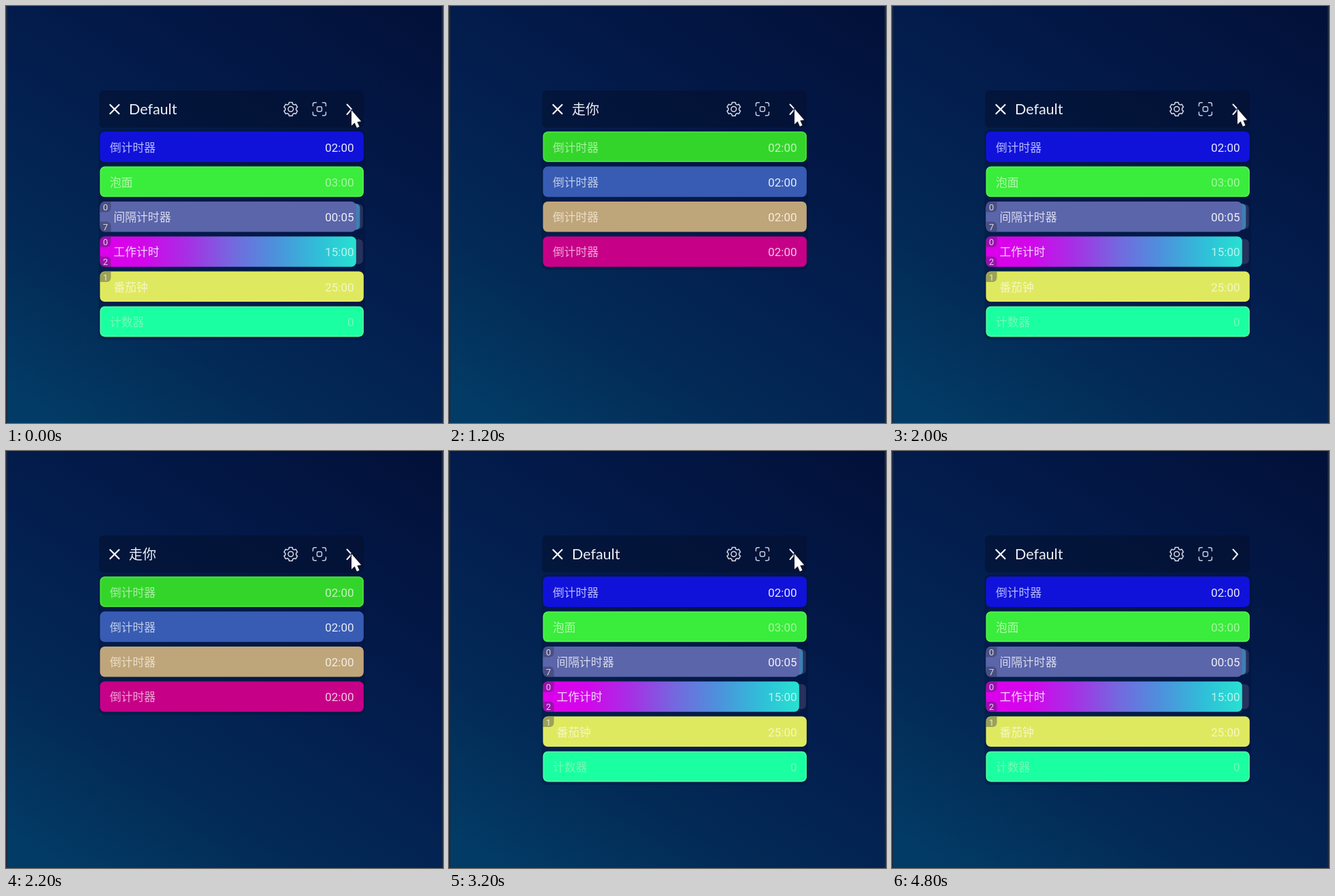
Recreate the animation shown at these times as an HTML page with a canvas. Size 640 by 612 pixels, loop 4.9 s.

```html
<!DOCTYPE html>
<html lang="zh">
<head>
<meta charset="utf-8">
<title>Timers</title>
<style>
html, body { margin: 0; width: 100%; height: 100%; overflow: hidden; background: #031a48; }
canvas { display: block; width: 640px; height: 612px; }
</style>
</head>
<body>
<canvas id="stage" width="640" height="612"></canvas>
<script>
const ctx = document.getElementById('stage').getContext('2d');
const LOOP = 4900;
const CJK = '"Noto Sans CJK SC", "Noto Sans CJK", sans-serif';
const LATIN = 'Roboto, "Noto Sans", sans-serif';
const LEFT = 137.6, WIDTH = 386.2, ROW_H = 44.6, TOP = 184.3, PITCH = 51.3;

// Page switches: time and page index
const switches = [[0, 0], [500, 1], [1300, 0], [2200, 1], [3000, 0]];
const CURSOR_END = 4000;

const pages = [
  {
    title: 'Default', font: '400 21.5px Lato, "Noto Sans", sans-serif', rows: [
      { name: '倒计时器', time: '02:00', fill: '#1012da', ink: '#b9bbff', num: '#e8e9ff' },
      { name: '泡面', time: '03:00', fill: '#3aec3c', ink: '#b4faaf', num: '#a4f89e', edge: '#55f050' },
      { name: '间隔计时器', time: '00:05', fill: '#5b65a9', ink: '#d9dcef', num: '#eef0fa', tags: ['0', '7'], gap: 11, sliver: '#3f7fb4' },
      { name: '工作计时', time: '15:00', fill: 'rainbow', ink: '#f3d9fb', num: '#b4f4ee', tags: ['0', '2'], gap: 11 },
      { name: '番茄钟', time: '25:00', fill: '#dfe960', ink: '#f4f7c0', num: '#f4f7c0', tags: ['1'] },
      { name: '计数器', time: '0', fill: '#1affa2', ink: '#74fab4', num: '#74fab4', edge: '#5bf7a0' }
    ]
  },
  {
    title: '走你', font: '400 20px ' + CJK, rows: [
      { fill: '#34d52b', ink: '#a9efa2', num: '#c0f4ba', edge: '#4ae040' },
      { fill: '#385cb3', ink: '#c3cee9', num: '#e6ebf7' },
      { fill: '#bfa57a', ink: '#eadfca', num: '#f3ecdf' },
      { fill: '#c70088', ink: '#f0a6d8', num: '#f6c4e5' }
    ].map(row => ({ name: '倒计时器', time: '02:00', ...row }))
  }
];

function box(x, y, w, h, r, fill) {
  ctx.beginPath();
  ctx.roundRect(x, y, w, h, r);
  ctx.fillStyle = fill;
  ctx.fill();
}

function text(str, x, y, font, color, align = 'left') {
  ctx.font = font;
  ctx.fillStyle = color;
  ctx.textAlign = align;
  ctx.fillText(str, x, y);
}

function line(points, width, color, close) {
  ctx.beginPath();
  points.forEach(([x, y]) => ctx.lineTo(x, y));
  if (close) ctx.closePath();
  ctx.lineWidth = width;
  ctx.strokeStyle = color;
  ctx.stroke();
}

function gradient(x0, y0, x1, y1, colors) {
  const g = ctx.createLinearGradient(x0, y0, x1, y1);
  colors.forEach((c, i) => g.addColorStop(i / (colors.length - 1), c));
  return g;
}

function drawBackground() {
  ctx.fillStyle = gradient(540, -40, 110, 640, ['#021139', '#031745', '#031f4f', '#032a56', '#023c66']);
  ctx.fillRect(0, 0, 640, 612);
  ctx.fillStyle = '#1d2940';
  ctx.fillRect(0, 0, 2, 612);
  ctx.fillRect(638, 0, 2, 612);
}

function drawGear(cx, cy) {
  const pts = [];
  for (let i = 0; i < 6; i++) {
    const mid = i * Math.PI / 3 + Math.PI / 6;
    for (const [turn, r] of [[-0.36, 8], [-0.24, 10.2], [0.24, 10.2], [0.36, 8]]) {
      pts.push([cx + r * Math.cos(mid + turn), cy + r * Math.sin(mid + turn)]);
    }
  }
  line(pts, 1.5, '#d5dbe8', true);
  ctx.beginPath();
  ctx.arc(cx, cy, 3.8, 0, 7);
  ctx.stroke();
}

function drawScan(cx, cy) {
  ctx.lineWidth = 1.5;
  ctx.strokeStyle = '#c3cbdc';
  for (const sx of [-1, 1]) for (const sy of [-1, 1]) {
    ctx.beginPath();
    ctx.moveTo(cx + sx * 9.5, cy + sy * 4.5);
    ctx.lineTo(cx + sx * 9.5, cy + sy * 7);
    ctx.quadraticCurveTo(cx + sx * 9.5, cy + sy * 9.5, cx + sx * 7, cy + sy * 9.5);
    ctx.lineTo(cx + sx * 4.5, cy + sy * 9.5);
    ctx.stroke();
  }
  ctx.beginPath();
  ctx.roundRect(cx - 3.5, cy - 3.5, 7, 7, 2);
  ctx.stroke();
}

function drawHeader(page) {
  box(LEFT - 1, 124, WIDTH + 1, 54.5, 6, 'rgba(4, 14, 42, 0.5)');
  ctx.lineCap = ctx.lineJoin = 'round';
  line([[152.5, 145], [165.5, 158]], 2.2, '#fff');
  line([[165.5, 145], [152.5, 158]], 2.2, '#fff');
  text(page.title, 180, 159.3, page.font, '#eef1f7');
  drawGear(417, 151.3);
  drawScan(459, 151.3);
  line([[499.5, 144.5], [506, 151.5], [499.5, 159]], 2, '#f2f4f8');
}

function drawRow(row, y, age) {
  // Partial bars shrink from full width when their page opens
  const gap = (row.gap || 0) * (1 - Math.max(0, 1 - age / 190) ** 1.9);
  const w = WIDTH - gap;
  if (row.gap) {
    box(LEFT, y + 4, WIDTH - 1, ROW_H - 8, 6, '#26315c');
    if (row.sliver) box(LEFT, y + 3, WIDTH - gap * 0.5, ROW_H - 6, 6, row.sliver);
  }
  const fill = row.fill === 'rainbow'
    ? gradient(LEFT, 0, LEFT + WIDTH, 0, ['#dd00ea', '#d206ea', '#a630e5', '#7468df', '#4c92dc', '#2fc0d8', '#25e8d0'])
    : row.fill;
  box(LEFT, y, w, ROW_H, 7, fill);
  if (row.edge) {
    ctx.beginPath();
    ctx.roundRect(LEFT + 1, y + 1, w - 2, ROW_H - 2, 6);
    ctx.lineWidth = 1.5;
    ctx.strokeStyle = row.edge;
    ctx.stroke();
  }
  (row.tags || []).forEach((tag, i) => {
    const ty = y + 0.5 + i * 29;
    box(LEFT, ty, 16, 15, i ? [0, 6, 0, 7] : [7, 0, 6, 0], 'rgba(45, 45, 70, 0.38)');
    text(tag, LEFT + 8, ty + 12.5, '13px ' + LATIN, 'rgba(255, 255, 255, 0.78)', 'center');
  });
  text(row.name, row.tags ? 157.5 : 152, y + 29.2, '16.8px ' + CJK, row.ink);
  text(row.time, 509.5, y + 29.2, '17px ' + LATIN, row.num, 'right');
}

function drawCursor(x, y) {
  const shape = [[0, 0], [0, 24.5], [5.3, 19.8], [9, 28], [13, 26.2], [9.4, 18.4], [16, 17.6]]
    .map(([dx, dy]) => [x + dx * 0.88, y + dy * 0.92]);
  ctx.lineJoin = 'round';
  line(shape, 2.4, '#10162c', true);
  ctx.fillStyle = '#fff';
  ctx.fill();
}

function draw(t) {
  const [start, index] = switches.filter(s => s[0] <= t).pop();
  const page = pages[index];
  const age = start ? t - start : LOOP;
  drawBackground();
  box(LEFT - 2, 181, WIDTH + 4, page.rows.length * PITCH + 1, 8, 'rgba(3, 16, 55, 0.35)');
  drawHeader(page);
  page.rows.forEach((row, i) => drawRow(row, TOP + i * PITCH, age));
  if (t < CURSOR_END) drawCursor(506, 151 + 2 * Math.max(0, 1 - t / 200));
}

let begin;
function tick(now) {
  begin ??= now;
  draw((now - begin) % LOOP);
  requestAnimationFrame(tick);
}
draw(0);
requestAnimationFrame(tick);
</script>
</body>
</html>
```
